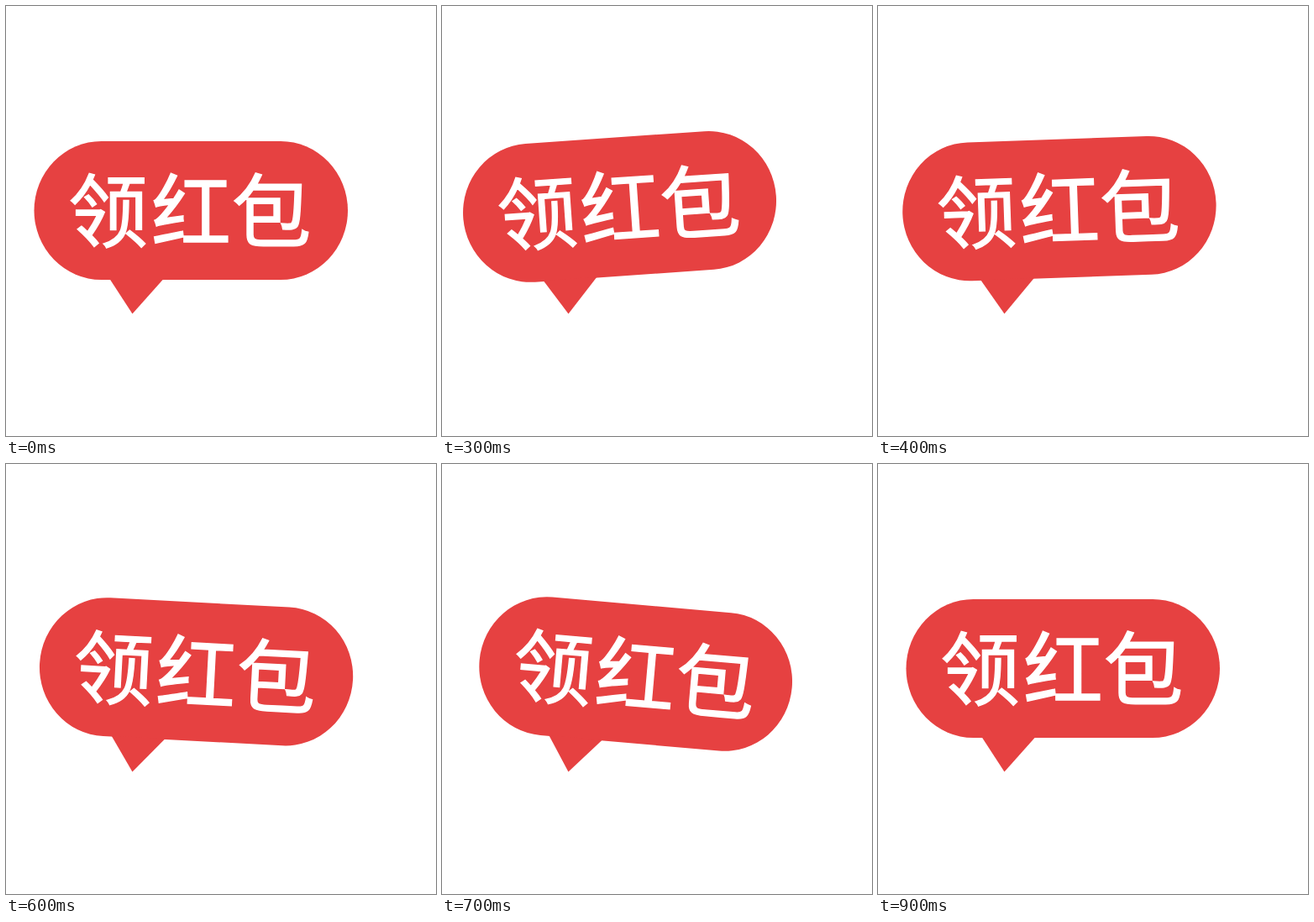
An HTML page that plays this animation: 512x512 px, repeating every 1 s.

```html
<!DOCTYPE html>
<html lang="zh-CN">
<head>
<meta charset="utf-8">
<style>
  html, body { margin: 0; width: 100%; height: 100%; overflow: hidden; background: #fff; }
  svg { display: block; width: 100vw; height: 100vh; }
  .shape { fill: #e64141; }
  text {
    font: 400 95px "Noto Sans CJK SC", "Noto Sans CJK", sans-serif;
    fill: #fff;
    stroke: #fff;
    stroke-width: 1.4px;
  }
</style>
</head>
<body>
<svg viewBox="0 0 512 512">
  <g id="bubble">
    <rect class="shape" x="33.5" y="161" width="373.5" height="165" rx="80" ry="82.5"/>
    <path class="shape" d="M123.5 325H187.5L150.5 366.5Z"/>
    <text x="74 173 268.5" y="280.2">领红包</text>
  </g>
</svg>
<script>
  const bubble = document.getElementById('bubble');
  const stepMs = 100;
  // Tilt in degrees for each step; the bubble rocks on the tip of its tail.
  const tilts = [0, 0, -2, -4, -2, 0, 3, 5, 3, 0];

  function draw(now) {
    const step = Math.floor(now / stepMs) % tilts.length;
    bubble.setAttribute('transform', `rotate(${tilts[step]} 150.5 366)`);
    requestAnimationFrame(draw);
  }
  draw(performance.now());
</script>
</body>
</html>
```
